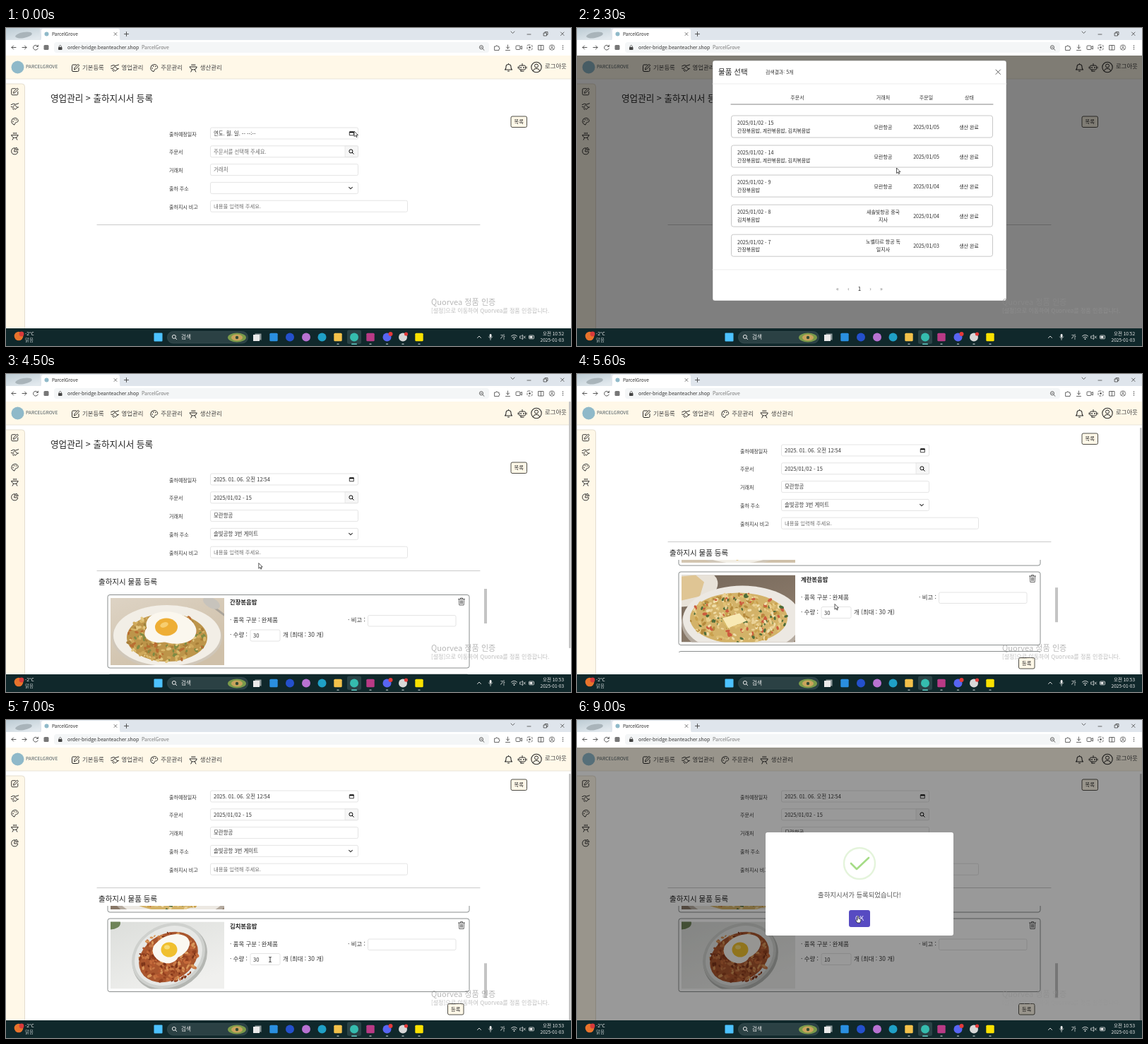
An HTML page for the animation above (9.1 s loop, 800x450 px).

```html
<!DOCTYPE html>
<html lang="ko">
<head>
<meta charset="utf-8">
<title>ParcelGrove</title>
<style>
html, body { margin: 0; width: 100%; height: 100%; overflow: hidden; background: #fff; }
svg { display: block; width: 100%; height: 100%; }
text { font-family: "Noto Sans CJK KR", "Noto Sans", sans-serif; white-space: pre; }
.num text { font-family: "Liberation Sans", "Noto Sans CJK KR", sans-serif; }
</style>
</head>
<body>
<svg id="stage" viewBox="0 0 800 450" xmlns="http://www.w3.org/2000/svg"></svg>
<script>
const LOOP = 9100, STEP = 100;
const CREAM = '#fff8e8', INK = '#2b2b2b';

// ---- drawing helpers: text is placed by its vertical centre ----
const text = (x, y, s, size, fill = INK, extra = '') =>
  `<text x="${x}" y="${(y + size * .37).toFixed(2)}" font-size="${size}" fill="${fill}" ${extra}>${s}</text>`;
const MID = 'text-anchor="middle"', END = 'text-anchor="end"';
const box = (x, y, w, h, fill = '#fff', stroke = 'none', r = 0, extra = '') =>
  `<rect x="${x}" y="${y}" width="${w}" height="${h}" rx="${r}" fill="${fill}" stroke="${stroke}" ${extra}/>`;
const dot = (x, y, r, fill, stroke = 'none', extra = '') =>
  `<circle cx="${x}" cy="${y}" r="${r}" fill="${fill}" stroke="${stroke}" ${extra}/>`;
const oval = (x, y, rx, ry, fill, turn = 0) =>
  `<ellipse cx="${x}" cy="${y}" rx="${rx}" ry="${ry}" fill="${fill}" transform="rotate(${turn} ${x} ${y})"/>`;
const line = (d, color = INK, w = 1, extra = '') =>
  `<path d="${d}" fill="none" stroke="${color}" stroke-width="${w}" stroke-linecap="round" stroke-linejoin="round" ${extra}/>`;
const at = (x, y, body, k = 1) => `<g transform="translate(${x} ${y}) scale(${k})">${body}</g>`;
const group = (id, body, extra = '') => `<g id="${id}" ${extra}>${body}</g>`;

// ---- icons centred on 0,0 ----
const icon = {
  edit: line('M1-4.5H-3.5Q-5-4.5-5-3V3.5Q-5 5-3.5 5H3Q4.5 5 4.5 3.5V0M-2 2L-1.5-.2 3.6-5.2 5.2-3.6 .2 1.5Z'),
  deal: line('M-5.5-2.5L-2-4 1-3 5.5-4.5M-5.5 .5L-3 1 .5 4.5 4 1.5 0-2-2.5 0M4 1.5L5.5 1M-3.5 3L-1.5 5'),
  palette: line('M-1 5A5 5 0 1 1 5-1C5 2 2 1 1 2S1 5-1 5Z') +
    dot(-2.5, .5, .8, INK) + dot(-1, -2.4, .8, INK) + dot(2, -2, .8, INK),
  grill: line('M-5-1.5H5Q4 2.5 0 2.5T-5-1.5M-2 2.5L-3.5 5.5M2 2.5L3.5 5.5M-2-5V-3.5M0-5V-3.5M2-5V-3.5'),
  pie: line('M-.5-4.5A4.8 4.8 0 1 0 4.5 1H-.5ZM2-5A4 4 0 0 1 5-1.5H2Z'),
  bell: line('M-5 3H5Q3.5 2 3.5-1A3.5 3.5 0 0 0-3.5-1Q-3.5 2-5 3M-1 5H1M0-5.5V-4.6', INK, 1.1),
  bot: box(-4.5, -3, 9, 6, 'none', INK, 1.5) + line('M0-3V-5.5M-6-1V1M6-1V1M-2 3V5M-2 5.2H2') +
    dot(-2, 0, .9, INK) + dot(2, 0, .9, INK),
  user: dot(0, 0, 7.2, 'none', INK, 'stroke-width="1.1"') + dot(0, -2, 2.5, 'none', INK) + line('M-4.6 5Q-4 1.8 0 1.8T4.6 5'),
  find: dot(-.6, -.6, 2.5, 'none', 'currentColor') + line('M1.3 1.3L3.2 3.2', 'currentColor'),
  trash: line('M-4.5-3.5H4.5M-1.5-3.5V-5H1.5V-3.5M-3.6-3.5L-3.2 5H3.2L3.6-3.5M-1.3-1.5V3M0-1.5V3M1.3-1.5V3', '#444', .8),
  down: line('M-2.4-1.2L0 1.2 2.4-1.2', '#333', 1.1),
  cal: line('M-2.8-2H2.8V2.8H-2.8Z', '#111', .8) + box(-3, -2.6, 6, 2, '#111')
};
const MENU = ['edit', 'deal', 'palette', 'grill'];

// ---- browser frame ----
function browser() {
  const g = '#444';
  return box(0, 0, 800, 18, '#dfe5ec') + box(0, 0, 48, 18, 'url(#sky)') +
    oval(25, 10, 12, 4, '#a9b4ba', -10) +
    `<path d="M48 18Q50 17 50 14V4Q50 1 53 1H158Q161 1 161 4V14Q161 17 163 18Z" fill="#fff"/>` +
    dot(57.5, 8.5, 3, '#8fb9c9') + text(65, 8.5, 'ParcelGrove', 6.6) +
    line('M153 6.5L157 10.5M157 6.5L153 10.5', g, .7) + line('M167.5 8.5H173.5M170.5 5.5V11.5', g, .9) +
    line('M715 5L717.5 7.5 720 5M738 9H743M761.5 7H765.5V11H761.5ZM763 7V5.5H767V9.5H765.5M785.5 6L790 10.5M790 6L785.5 10.5', g, .8) +
    box(0, 17, 800, 22, '#fff') + box(68, 20, 616, 15, '#f4f6f7', 'none', 4) +
    line('M14 27.5H8M10.5 25L8 27.5 10.5 30M23 27.5H29M26.5 25L29 27.5 26.5 30M45 26A3.4 3.4 0 1 0 45.2 29M45.4 24.2V26.3H43.2', g, .9) +
    box(53.5, 24, 7, 7, '#777', 'none', 1.5) +
    box(74, 27, 5.5, 4, g, 'none', .8) + line('M75.2 27V25.7Q76.7 23 78.3 25.7V27', g, .8) +
    text(87, 27.5, 'order-bridge.beanteacher.shop', 6.95, '#333') + text(192, 27.5, 'ParcelGrove', 6.95, '#777') +
    dot(673, 27.3, 2.6, 'none', g, 'stroke-width=".8"') + line('M675 29.5L677 31.3M672 27.3H674', g, .8) +
    line('M692 26H694Q694.5 23 696 26H698V28Q700.5 28.8 698 30V31.5H692ZM710.5 24V29M708.3 27L710.5 29 712.7 27M707.5 31.5H713.5', g, .8) +
    box(722, 25, 6, 5.5, 'none', g, 1, 'stroke-width=".8"') + line('M728 27L730.5 25.5V30L728 28.5', g, .8) +
    box(738, 24, 7, 7, 'none', g, 1.5, 'stroke-width=".8" stroke-dasharray="3 1.5"') + dot(741.5, 27.5, 1.3, g) +
    line('M754 24.5H761V31H754ZM757.5 24.5V31', g, .8) +
    at(773, 27.5, icon.user, .52) + [25, 27.5, 30].map(y => dot(788.5, y, .7, g)).join('');
}

function header() {
  const names = ['기본등록', '영업관리', '주문관리', '생산관리'];
  return box(0, 39, 800, 33, CREAM) + line('M0 72H800', '#e4dfd2', .8) +
    dot(16.5, 55.5, 9, '#8fb9c9') + text(28, 55, 'PARCELGROVE', 6.7, '#4d5b60') +
    names.map((n, i) => at(98.5 + 55.6 * i, 56.5, icon[MENU[i]]) + text(108 + 55.6 * i, 55.7, n, 8.4, '#444')).join('') +
    at(711.5, 56, icon.bell) + at(731, 56, icon.bot) + at(751, 55.5, icon.user) + text(763, 54, '로그아웃', 8.4, '#444');
}

const sidebar = () => box(-6, 79, 32.5, 360, CREAM, '#ddd6c6', 4, 'stroke-width=".8"') +
  [...MENU, 'pie'].map((n, i) => at(12.5, 90 + 21 * i, icon[n], .95)).join('');

// ---- form ----
const button = (x, y, s) => box(x, y, 22.5, 15.5, CREAM, '#3c3a34', 2, 'stroke-width=".9"') + text(x + 11.2, y + 7.8, s, 7.2, INK, MID);
const field = (y, w = 209) => box(289.5, y, w, 16, '#fff', '#dedede', 2, 'stroke-width=".8"');

function form() {
  const labels = ['출하예정일자', '주문서', '거래처', '출하 주소', '출하지시 비고'];
  return text(63, 99, '영업관리 > 출하지시서 등록', 12.6, '#222') + button(715, 125, '목록') +
    labels.map((s, i) => text(231, 150 + 25.8 * i, s, 7, '#333') + field(141 + 25.8 * i, i == 4 ? 279 : 209)).join('') +
    box(480, 167, 18.3, 15.6, '#f6f6f6', '#dedede', 0, 'stroke-width=".6"') + at(489, 175, icon.find) +
    at(489.5, 149, icon.cal) + at(488, 226.5, icon.down) +
    ['date', 'order', 'client', 'place'].map((id, i) => text(294, 149 + 25.8 * i, '', 7.45, '#333', `id="${id}"`)).join('') +
    text(294, 252.3, '내용을 입력해 주세요.', 7.35, '#707070') +
    line('M129 278.5H671', '#c6c6c6', .9);
}

// ---- dishes ----
function random(seed) {
  return () => (seed = (seed * 16807) % 2147483647) / 2147483647;
}
function grains(seed, cx, cy, rx, ry, colors, n) {
  const r = random(seed);
  let out = '';
  for (let i = 0; i < n; i++) {
    const a = r() * 6.283, d = Math.sqrt(r()), k = .7 + r() * .8;
    out += oval((cx + Math.cos(a) * d * rx).toFixed(1), (cy + Math.sin(a) * d * ry).toFixed(1),
      (2.4 * k).toFixed(1), (1.4 * k).toFixed(1), colors[i % colors.length], Math.round(r() * 180));
  }
  return out;
}
const dishes = [
  () => box(0, 0, 161, 95, 'url(#linen)') + line('M137 6L161 24', '#aaa49b', 3) + oval(143, 7, 13, 7, '#c7c3bc', 28) +
    oval(80, 56, 78, 44, '#d0c7b9') + oval(80, 53, 76, 43, '#f2eee6') + oval(80, 56, 57, 34, '#bd954a') +
    grains(11, 80, 56, 57, 34, ['#d9b768', '#a87e38', '#e3c780', '#b96d32', '#7f8b43', '#cfa85a'], 260) +
    oval(86, 42, 36, 22, '#fbf7ee', 12) + oval(72, 48, 24, 15, '#fbf7ee', -8) + oval(79, 41, 16, 12.5, '#eeae35') + oval(76, 38, 6, 3.5, '#f7ce70', -20),
  () => box(0, 0, 161, 95, 'url(#wood)') + oval(8, 18, 44, 26, '#e8e2d8', -12) +
    `<path d="M0 2L20 0 32 10 26 30 0 36Z" fill="#dfc594"/>` +
    oval(86, 68, 86, 49, '#b5aba0') + oval(86, 63, 84, 48, '#ece8e2') + oval(81, 61, 69, 36, '#d3b268') +
    grains(23, 81, 61, 69, 35, ['#ead196', '#c9a04c', '#f0deaa', '#cc5c3e', '#e0c074', '#b58a3c', '#4f6d3a', '#e8cd88'], 340) +
    `<path d="M58 61L82 54 92 65 66 75Z" fill="#f8e9b4"/><path d="M58 61L66 75 66 78 57 64Z" fill="#d9bd6c"/>`,
  () => box(0, 0, 161, 95, 'url(#cloth)') + oval(0, 2, 14, 9, '#6f8458') +
    oval(84, 51, 55, 45, '#b4b6b2', -28) + oval(82, 48, 54, 44, '#cfd1ce', -28) + oval(82, 48, 50, 40, '#e6e7e5', -28) +
    oval(82, 50, 44, 33, '#a9562e', -28) +
    grains(37, 82, 50, 41, 35, ['#c87845', '#94401f', '#d9975a', '#b3582f', '#7d3419', '#c56a3a'], 260) +
    oval(86, 36, 27, 17, '#faf8f2', -20) + oval(78, 43, 19, 15, '#faf8f2', 25) + oval(83, 39.5, 11.5, 10.5, '#f0c02f') + oval(80, 36, 4, 3, '#f8dc74')
];

function card(i) {
  const name = ['간장볶음밥', '계란볶음밥', '김치볶음밥'][i];
  return at(0, 312.5 + 112.5 * i,
    box(144, 0, 512, 103.5, '#fff', '#7d8282', 3, 'stroke-width=".9"') +
    `<svg x="148" y="4.5" width="161" height="95">${dishes[i]()}</svg>` +
    text(317, 10.5, name, 8.35, '#222', 'font-weight="700"') + at(645, 9.5, icon.trash) +
    text(317, 35.5, '· 품목 구분 : 완제품', 8.4, '#333') + text(484, 35.5, '· 비고 :', 8.4, '#333') +
    box(512.5, 29, 124.5, 15.5, '#fff', '#dedede', 2, 'stroke-width=".8"') +
    text(317, 56.5, '· 수량 :', 8.4, '#333') + box(346, 49.5, 42, 16, '#fff', '#dedede', 2, 'stroke-width=".8"') +
    text(350, 58, '30', 7.6, '#333', `id="qty${i}"`) + text(392, 56.5, '개 (최대 : 30 개)', 8.45, '#333'));
}
const goods = () => text(131, 294, '출하지시 물품 등록', 10.5, '#222') +
  `<g clip-path="url(#listClip)">${group('list', [0, 1, 2].map(card).join(''))}</g>` +
  box(677, 304, 4, 49, '#c4c4c4', 'none', 0, 'id="listThumb"') + button(625.5, 442.5, '등록');

// ---- date picker ----
function picker() {
  let s = box(290, 157, 204, 146, '#fff', '#bbb', 3, 'stroke-width=".7" filter="url(#shade)"') +
    text(295, 169.5, '2025년 1월', 6.7, '#222', 'font-weight="700"') + '<path d="M328.5 168.5H333L330.7 171Z" fill="#222"/>' +
    line('M373.5 174V166M370 169.5L373.5 166 377 169.5', '#c4c4c4', .9) + line('M390 166V174M386.5 170.5L390 174 393.5 170.5', '#333', .9) +
    line('M402.5 157.5V303', '#ddd', .8) + box(368.3, 195.8, 14.2, 14.2, '#fff', '#999', 0, 'stroke-width=".8"') +
    box(310, 210.3, 14.2, 14.4, '#0075ff', 'none', 1, 'id="dayBox"');
  [...'일월화수목금토'].forEach((d, i) => s += text(302.3 + 14.6 * i, 188, d, 6.4, '#333', MID));
  for (let i = 0; i < 42; i++) {
    const n = i - 2, day = n < 1 ? n + 31 : n > 31 ? n - 31 : n;
    const color = n < 4 ? '#b8b8b8' : n > 31 ? '#858585' : '#222';
    s += text(302.3 + 14.6 * (i % 7), 203 + 14.6 * Math.floor(i / 7), day, 6.8, color, MID + (n == 6 ? ' id="day6"' : ''));
  }
  s += text(301, 293, '삭제', 6.8, '#2c76b8') + text(391.5, 293, '오늘', 6.8, '#bbb', END) +
    box(405.5, 200.5, 27, 17.5, '#0075ff', '#101010', 1, 'id="hourBox"') + box(434.5, 165, 27.5, 17.5, '#0075ff', 'none', 1, 'id="minBox"') +
    box(464, 165, 27.5, 18.5, '#0075ff', 'none', 1);
  ['10', '11', '12', '01', '02', '03', '04'].forEach((h, i) =>
    s += text(419, 173 + 18.3 * i + (i > 2 ? 4.3 : 0), h, 7.4, '#222', `${MID} id="h${h}"`));
  for (let i = 0; i < 7; i++) s += text(448, 173 + 18.3 * i, 52 + i, 7.4, '#222', `${MID} id="m${52 + i}"`);
  return s + text(477.5, 174, '오전', 7.4, '#fff', MID + ' font-weight="700"') + text(477.5, 192.5, '오후', 7.4, '#222', MID);
}

const options = () => box(289.5, 235, 209, 31, '#fff', '#777', 0, 'stroke-width=".7"') +
  box(290, 250, 208, 15.5, '#1e78d6') + text(294, 257.5, '솔빛공항 3번 게이트', 7.45, '#fff');

// ---- dialogs ----
function orders() {
  const rows = [
    ['15', '간장볶음밥, 계란볶음밥, 김치볶음밥', '모란항공', '', '05'],
    ['14', '간장볶음밥, 계란볶음밥, 김치볶음밥', '모란항공', '', '05'],
    ['9', '간장볶음밥', '모란항공', '', '04'],
    ['8', '김치볶음밥', '새솔빛항공 중국', '지사', '04'],
    ['7', '간장볶음밥', '노벨타르 항공 독', '일지사', '03']
  ];
  return box(192, 46, 416, 340, '#fff', '#777', 3, 'stroke-width=".5"') + text(200, 62.5, '물품 선택', 10.5, '#222', 'font-weight="500"') +
    text(267, 62.5, '검색결과: 5개', 6.9, '#333') + line('M593 59L599.5 65.5M599.5 59L593 65.5', '#555', .9) +
    line('M192 79H608M192 342H608', '#e9e9e9', .8) + line('M218 108H589', '#777', .9) +
    [['주문서', 312], ['거래처', 433.5], ['주문일', 494.5], ['상태', 555.5]].map(([s, x]) => text(x, 98, s, 7, '#333', MID)).join('') +
    rows.map(([no, food, firm, rest, day], i) => at(0, 124 + 42.05 * i,
      box(218.5, 0, 370, 31, '#fff', '#c2c2c2', 3, 'stroke-width=".9"') +
      text(227, 10.7, '2025/01/02 - ' + no, 7.1) + text(227, 21, food, 6.95) +
      text(433.5, rest ? 10.7 : 16, firm, 7, INK, MID) + text(433.5, 21, rest, 7, INK, MID) +
      text(494.5, 16, '2025/01/' + day, 7, INK, MID) + text(555, 16, '생산 완료', 7, INK, MID))).join('') +
    ['«', '‹', '1', '›', '»'].map((s, i) => text(369 + 15.5 * i, 369, s, 8, i == 2 ? '#222' : '#777', MID)).join('');
}

const done = () => box(267, 159, 266, 146, '#fff', 'none', 3) +
  dot(400, 203, 22, 'none', '#e4f4db', 'stroke-width="2.4"') +
  line('M388 203L396 211 413 195', '#a5dc86', 2.6, 'id="check" pathLength="1" stroke-dasharray="1 2"') +
  text(400, 247.5, '출하지시서가 등록되었습니다!', 9.4, '#545454', MID) +
  box(385, 269, 30, 24, '#574bc2', 'none', 3) + text(400, 281, 'OK', 8.6, '#fff', MID);

// ---- desktop ----
function taskbar() {
  const w = '#eee';
  const apps = [[379, '#2a8fe0', 1], [402, '#2450cc'], [425, '#b872d2'], [447.5, '#1fa0c6'], [470, '#f2c14a', 1], [493, '#35bcae'],
    [516, '#b93a86', 1], [539.5, '#5865f2'], [562, '#d8d8d8'], [585, '#fae100', 1]];
  return box(0, 425, 800, 25, '#10282b') + dot(18, 436, 6.3, '#e8732c') + dot(22, 433, 3.4, '#d83a3a') +
    text(27, 433, '-2°C', 6.6, w) + text(27, 441.5, '맑음', 6.4, '#b5bfc0') +
    box(209.5, 431.5, 12, 12, '#4cc2ff', 'none', 1) + box(228.5, 429.5, 114, 16.5, '#2b4144', '#3c5255', 8, 'stroke-width=".7"') +
    `<g color="${w}">${at(238.5, 437.5, icon.find)}</g>` + text(248, 437.5, '검색', 7.6, w) +
    oval(327, 438, 13, 6.5, '#7a9a4a') + oval(327, 438, 8, 4.5, '#c9a45c') + dot(327, 438, 2.2, '#324a35') +
    box(352.5, 432.5, 9, 9, '#8e9a9c') + box(350, 434, 9, 9, '#eaeaea') +
    box(483, 427.5, 20, 19.5, '#2a4346', 'none', 2.5) +
    apps.map(([x, c, square], i) => (square ? box(x - 5.7, 431.8, 11.4, 11.4, c, 'none', 1.5) : dot(x, 437.5, 6, c)) +
      (i > 3 ? box(x - (i == 5 ? 4 : 1.7), 446.5, i == 5 ? 8 : 3.4, 1.4, i == 5 ? '#5fd0c8' : '#98a5a6', 'none', .7) : '')).join('') +
    dot(544.5, 433, 3, '#e33a3a') + dot(566.5, 433, 2.6, '#e33a3a') +
    line('M667.5 438.5L670 436 672.5 438.5', w, .9) + box(684.7, 433, 2.8, 5, w, 'none', 1.4) + line('M683.5 437Q686 441.5 688.7 437M686 439.5V441.5', w, .7) +
    text(703, 437.5, '가', 7.8, w, MID) +
    line('M715.5 436Q719.5 432.5 723.5 436M717 438Q719.5 436 722 438', w, .9) + dot(719.5, 440, .9, w) +
    line('M728 436H729.5L731.5 434.3V440.7L729.5 439H728ZM733 436L735.5 439M735.5 436L733 439', w, .7) +
    box(740.5, 435, 7, 4.8, 'none', w, 1, 'stroke-width=".8"') + box(741.5, 436, 4, 2.8, w) +
    text(790, 433, '', 6.5, w, END + ' id="clock"') + text(790, 441.8, '2025-01-03', 6.5, w, END);
}
const notice = () => `<g opacity=".62">` + text(602, 388, 'Quorvea 정품 인증', 11.1, '#8c8c8c', 'font-weight="300"') +
  text(602, 400.5, '[설정]으로 이동하여 Quorvea를 정품 인증합니다.', 8.05, '#969696', 'font-weight="300"') + '</g>';

const grad = (id, a, b) => `<linearGradient id="${id}" x2=".6" y2="1"><stop stop-color="${a}"/><stop offset="1" stop-color="${b}"/></linearGradient>`;
const pointers = {
  arrow: '<path d="M0 0V7.6L1.8 6 3 8.6 4.2 8 3 5.5H5.4Z" fill="#fff" stroke="#111" stroke-width=".7"/>',
  beam: line('M-1.4-3.6Q0-3.6 0-2.8Q0-3.6 1.4-3.6M0-3V3M-1.4 3.6Q0 3.6 0 2.8Q0 3.6 1.4 3.6', '#111', .8),
  hand: '<path d="M-1-4Q0-5 .8-4V-.8L3.6 0Q4.2 .6 3.8 2.4L3 5H-1.2L-3.4 1.6Q-3.4 .2-1 1.4Z" fill="#fff" stroke="#111" stroke-width=".7"/>'
};

document.getElementById('stage').innerHTML = '<defs>' + grad('sky', '#bccbd3', '#e2e9ee') + grad('linen', '#ddd3c4', '#cfc0a9') +
  grad('wood', '#75675a', '#8f7e6d') + grad('cloth', '#dcdedb', '#f0f0ee') +
  `<clipPath id="pageClip">${box(0, 72, 800, 353)}</clipPath><clipPath id="listClip">${box(130, 304, 540, 131)}</clipPath>
  <filter id="shade" x="-20%" y="-20%" width="140%" height="150%"><feDropShadow dx="0" dy="6" stdDeviation="6" flood-opacity=".28"/></filter></defs>` +
  box(0, 0, 800, 450) + header() + sidebar() +
  `<g clip-path="url(#pageClip)">${group('page', form() + group('goods', goods()))}</g>` +
  box(797, 39, 2.6, 349, '#c6c6c6', 'none', 1, 'id="pageThumb"') +
  group('picker', picker(), 'class="num"') + group('options', options()) +
  box(0, 39, 800, 386, '#000', 'none', 0, 'id="shadeLayer"') + group('orders', orders()) + group('done', done()) +
  browser() + notice() + taskbar() +
  group('pointer', Object.entries(pointers).map(([n, s]) => group(n, s)).join(''));

// ---- motion ----
const $ = id => document.getElementById(id);
const set = (id, name, v) => $(id).setAttribute(name, v);
const show = (id, on) => set(id, 'opacity', Number(on));
const write = (id, s) => { if ($(id).textContent !== s) $(id).textContent = s; };
const ramp = (t, a, b) => {
  const k = Math.min(1, Math.max(0, (t - a) / (b - a)));
  return k * k * (3 - 2 * k);
};
const PATH = [
  [0, 493, 146, 'arrow'], [400, 490, 150], [900, 318, 217], [1000, 318, 217], [1300, 420, 209], [1500, 438, 211],
  [1700, 449, 210], [1800, 449, 210], [2100, 488, 175], [2300, 452.5, 198], [2700, 430, 140], [2900, 430, 140],
  [3200, 470, 190, 'beam'], [3300, 478, 205, 'beam'], [3600, 488, 227, 'arrow'], [3800, 488, 227], [4200, 350, 256], [4400, 350, 256],
  [4800, 400, 330], [5600, 365, 325.5], [6200, 366, 327], [6800, 372, 338, 'beam'], [7000, 374, 339, 'beam'], [7600, 374, 339, 'beam'],
  [8000, 636, 408, 'hand'], [8300, 636, 408, 'hand'], [8800, 398, 282, 'hand'], [9100, 398, 282, 'hand']
];

function movePointer(t) {
  const i = PATH.findLastIndex(p => p[0] <= t);
  const a = PATH[i], b = PATH[i + 1] || a, k = a === b ? 0 : ramp(t, a[0], b[0]);
  set('pointer', 'transform', `translate(${a[1] + (b[1] - a[1]) * k} ${a[2] + (b[2] - a[2]) * k})`);
  for (const n in pointers) show(n, n === (a[3] || 'arrow'));
}

function mark(id, on) {
  set(id, 'fill', on ? '#fff' : '#222');
  set(id, 'font-weight', on ? 700 : 400);
}

function render(t) {
  const dated = t >= 1000, noon = t >= 1300, late = t >= 1800, chosen = t >= 2900;
  write('date', dated ? `2025. 01. 06. 오전 ${noon ? 12 : 10}:${late ? 54 : 52}` : '연도. 월. 일. -- --:--');
  write('order', chosen ? '2025/01/02 - 15' : '주문서를 선택해 주세요.');
  write('client', chosen ? '모란항공' : '거래처');
  for (const id of ['order', 'client']) set(id, 'fill', chosen ? '#333' : '#707070');
  write('place', t >= 4300 ? '솔빛공항 3번 게이트' : '');
  write('clock', t >= 2700 ? '오전 10:53' : '오전 10:52');

  show('picker', t >= 400 && t < 2000);
  show('dayBox', dated);
  mark('day6', dated);
  set('hourBox', 'y', noon ? 200.5 : 164.5);
  mark('h10', !noon);
  mark('h12', noon);
  set('minBox', 'y', late ? 201 : 165);
  mark('m52', !late);
  mark('m54', late);
  show('options', t >= 3700 && t < 4300);

  const open = ramp(t, 2000, 2300) * (1 - ramp(t, 2800, 3000));
  set('orders', 'opacity', open);
  set('orders', 'transform', `translate(0 ${-14 * (1 - open)})`);

  const scroll = 41 * ramp(t, 4500, 4900), inner = 104 * ramp(t, 4900, 5500) + 111.5 * ramp(t, 6100, 6700);
  show('goods', chosen);
  show('pageThumb', chosen);
  set('page', 'transform', `translate(0 ${-scroll})`);
  set('list', 'transform', `translate(0 ${-inner})`);
  set('listThumb', 'y', 304 + inner * .377);
  set('pageThumb', 'y', 39 + scroll * .904);
  write('qty2', t < 7200 ? '30' : t < 7400 ? '' : t < 7500 ? '1' : '10');

  const pop = ramp(t, 8200, 8500), size = .7 + .3 * pop;
  set('done', 'opacity', pop);
  set('done', 'transform', `translate(${400 * (1 - size)} ${232 * (1 - size)}) scale(${size})`);
  set('check', 'stroke-dashoffset', 1 - ramp(t, 8400, 8800));
  set('shadeLayer', 'opacity', Math.max(open * .5, pop * .4));
  movePointer(t);
}

const start = performance.now();
function tick() {
  const t = (performance.now() - start) % LOOP;
  render(Math.floor(t / STEP) * STEP);
  requestAnimationFrame(tick);
}
tick();
</script>
</body>
</html>
```
